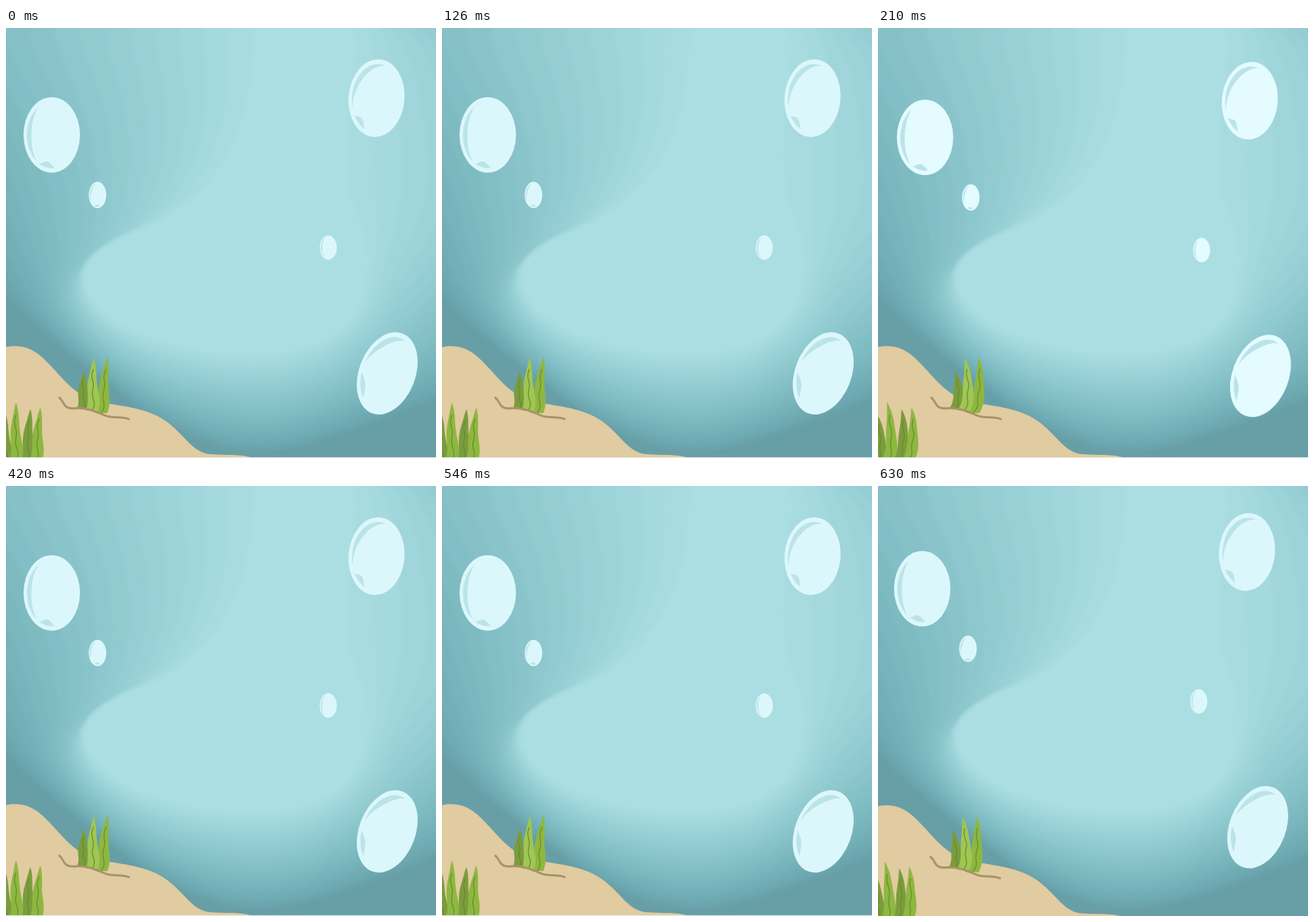
These frames come from a looping animation (564 by 564 pixels, 0.84 s). An HTML page with a canvas:

```html
<!DOCTYPE html>
<html lang="en">
<head>
<meta charset="utf-8">
<title>Under the sea</title>
<style>
html, body { margin: 0; width: 100%; height: 100%; overflow: hidden; background: #689fa7; }
canvas { display: block; }
</style>
</head>
<body>
<canvas id="stage" width="564" height="564"></canvas>
<script>
const SIZE = 564, STEP = 210, RAD = Math.PI / 180;
const ctx = document.getElementById('stage').getContext('2d');
const mix = (a, b, t) => a + (b - a) * t;

// Closed curve through the midpoints of the given corners
function blob(pts) {
  const path = new Path2D();
  pts.forEach(([x, y], i) => {
    const [px, py] = pts.at(i - 1), [nx, ny] = pts[(i + 1) % pts.length];
    if (!i) path.moveTo((px + x) / 2, (py + y) / 2);
    path.quadraticCurveTo(x, y, (x + nx) / 2, (y + ny) / 2);
  });
  return path;
}

// Water: bands that morph from the dark rim to the bright middle
const rim = [[-350, -60], [-140, 150], [-40, 325], [40, 400], [125, 465], [220, 535],
  [330, 570], [470, 532], [700, 440], [1200, 200], [700, -60]];
const core = [[325, -60], [322, 110], [250, 235], [95, 295], [112, 375], [240, 428],
  [390, 430], [470, 375], [478, 280], [440, 200], [472, -60]];
const BANDS = 18;

function paintWater() {
  const canvas = document.createElement('canvas');
  canvas.width = canvas.height = SIZE;
  const c = canvas.getContext('2d');
  c.fillStyle = '#689fa7';
  c.fillRect(0, 0, SIZE, SIZE);
  c.filter = 'blur(3px)';
  for (let i = 0; i <= BANDS; i++) {
    const t = i / BANDS, s = t ** 0.75;
    c.fillStyle = `rgb(${mix(104, 171, t)} ${mix(159, 222, s)} ${mix(167, 227, s)})`;
    c.fill(blob(rim.map(([x, y], k) => [mix(x, core[k][0], t), mix(y, core[k][1], t)])));
  }
  return canvas;
}
const water = paintWater();

const sand = new Path2D('M-2 419 C30 412 45 428 66 451 S100 487 130 492 S190 500 213 518 S245 557 268 559 S310 558 326 565 L-2 570Z');
const twig = new Path2D('M70 485 C77 490 74 499 88 499 C110 497 120 505 132 509 C142 512 152 509 161 513');

// Shines are [from, to] angles along the inside of the rim
const bubbles = [
  { x: 60, y: 140.3, rx: 37, ry: 49.5, tilt: 0, shines: [[126, 238], [83, 120]] },
  { x: 120, y: 219, rx: 11.5, ry: 17.3, tilt: 0, shines: [[150, 258], [70, 115]] },
  { x: 486, y: 92, rx: 36.7, ry: 51, tilt: 5, shines: [[160, 285], [112, 146]] },
  { x: 422.7, y: 288, rx: 11.2, ry: 16, tilt: 0, shines: [[115, 250]] },
  { x: 500, y: 453, rx: 37, ry: 56, tilt: 21, shines: [[183, 282], [122, 168]] }
];

const OLIVE = '#7b9c3d', GREEN = '#8eb740', LIGHT = '#a0c653';
const weeds = [
  { base: [101, 500], tip: [102, 451], color: OLIVE },
  { base: [125, 505], tip: [133, 432], color: GREEN },
  { base: [113, 502], tip: [115, 433], color: LIGHT },
  { base: [-1, 568], tip: [-1, 506], color: OLIVE },
  { base: [27, 568], tip: [32, 500], color: OLIVE },
  { base: [39, 568], tip: [45, 498], color: GREEN },
  { base: [13, 568], tip: [13, 491], color: GREEN }
];

const rest = { bubble: [0, 0], ground: [0, 0], lean: 0, bow: 0, fill: '#dcf7fb' };
const poses = [
  rest,
  { ...rest, bubble: [1.7, 3.3], lean: -1, bow: 5, fill: '#e4fbff' },
  rest,
  { ...rest, bubble: [-2, -5.5], ground: [-1, 1.5], lean: -3, bow: 4 }
];

function drawWeed({ base, tip, color }, lean, bow) {
  const leaf = new Path2D(), vein = new Path2D(), N = 24;
  for (let i = 0; i <= 2 * N; i++) {
    const t = 1 - Math.abs(1 - i / N), side = i < N ? -1 : 1;
    const x = mix(base[0], tip[0] + lean, t) + bow * Math.sin(Math.PI * t) + 2 * Math.sin(8 * t) * (1 - t);
    const y = mix(base[1], tip[1], t);
    leaf.lineTo(x + side * 8 * Math.max(0, Math.cos(Math.PI / 2 * t)) ** 0.75, y);
    if (i < N * 0.8) vein.lineTo(x + 1.3 * Math.sin(16 * t), y);
  }
  ctx.fillStyle = color;
  ctx.fill(leaf);
  ctx.strokeStyle = '#668a2f';
  ctx.lineWidth = 1.1;
  ctx.stroke(vein);
}

function drawBubble({ x, y, rx, ry, tilt, shines }, fill) {
  ctx.save();
  ctx.translate(x, y);
  ctx.rotate(tilt * RAD);
  ctx.scale(rx, ry);
  ctx.fillStyle = fill;
  ctx.beginPath();
  ctx.arc(0, 0, 1, 0, 2 * Math.PI);
  ctx.fill();
  ctx.fillStyle = '#bbe4e8';
  for (const [from, to] of shines) {
    const N = 20;
    ctx.beginPath();
    for (let i = 0; i <= 2 * N; i++) {
      const t = 1 - Math.abs(1 - i / N), a = mix(from, to, t) * RAD;
      const r = 0.88 - (i > N ? 0.16 * Math.sin(Math.PI * t) : 0);
      ctx.lineTo(r * Math.cos(a), r * Math.sin(a));
    }
    ctx.fill();
  }
  ctx.restore();
}

function draw({ bubble, ground, lean, bow, fill }) {
  ctx.drawImage(water, 0, 0);

  ctx.save();
  ctx.translate(...ground);
  ctx.fillStyle = '#e1cba0';
  ctx.fill(sand);
  weeds.forEach(w => drawWeed(w, lean, bow));
  ctx.strokeStyle = '#a89268';
  ctx.lineWidth = 2.8;
  ctx.lineCap = 'round';
  ctx.stroke(twig);
  ctx.restore();

  ctx.save();
  ctx.translate(...bubble);
  bubbles.forEach(b => drawBubble(b, fill));
  ctx.restore();

  // Pale bottom edge, hidden while the ground sinks
  if (!ground[1]) {
    ctx.fillStyle = '#e3eeee';
    ctx.fillRect(0, SIZE - 1, SIZE, 1);
  }
}

let shown = -1;
function tick() {
  const i = Math.floor(performance.now() / STEP) % poses.length;
  if (i !== shown) draw(poses[shown = i]);
  requestAnimationFrame(tick);
}
tick();
</script>
</body>
</html>
```
